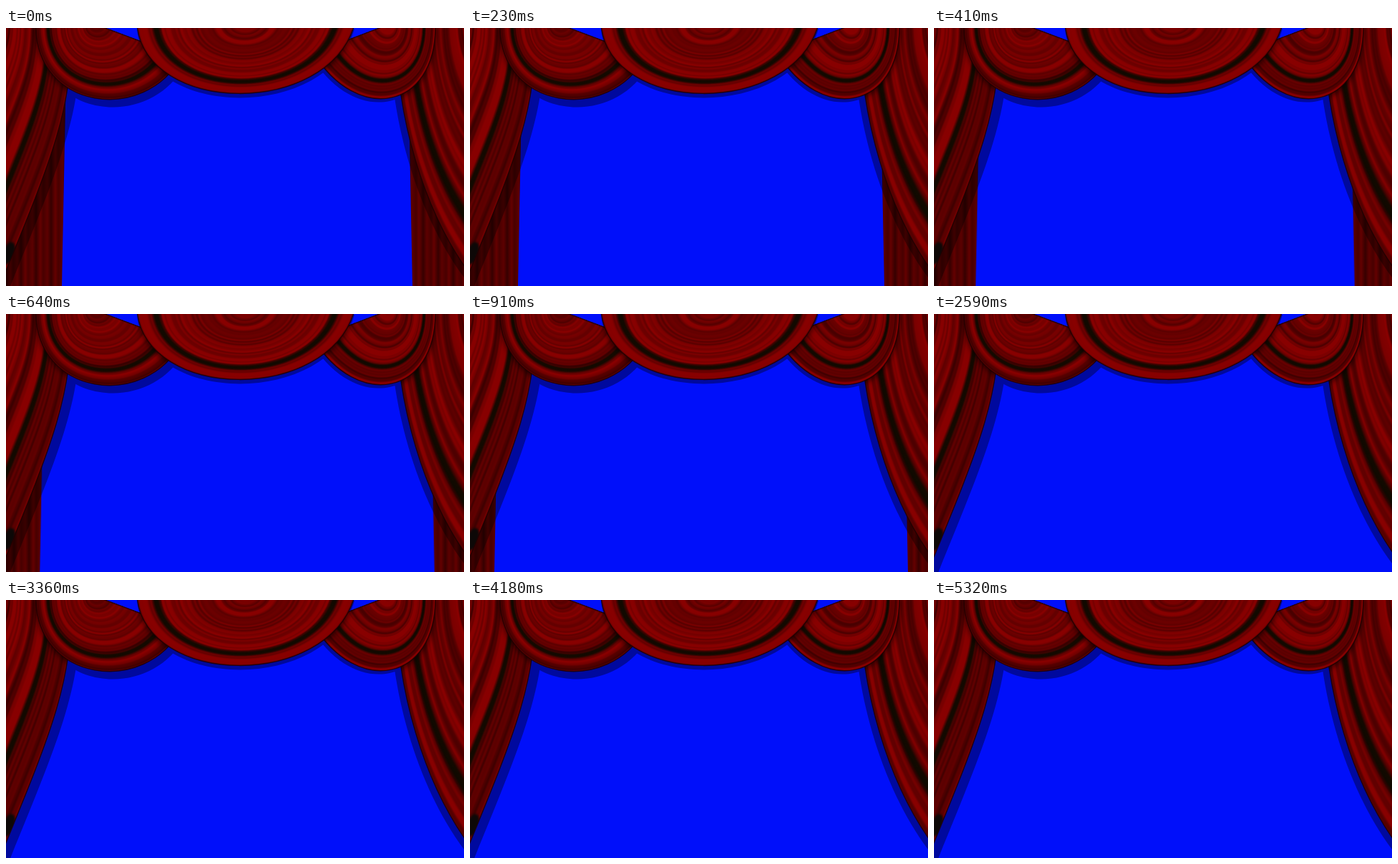
An HTML page with a canvas that plays this animation: 640x360 px, repeating every 5400 ms.

```html
<!DOCTYPE html>
<html lang="en">
<head>
<meta charset="utf-8">
<title>Stage curtain</title>
<style>
  html, body { margin: 0; width: 100%; height: 100%; overflow: hidden; }
  #stage { position: relative; width: 640px; height: 360px; overflow: hidden; background: #000ffa; }
  canvas { position: absolute; left: 0; top: 0; }
  #shadow { opacity: .37; }

  .panel {
    position: absolute; top: 60px; width: 84px; height: 300px;
    background: repeating-linear-gradient(90deg, #360000, #640000 6px, #480000 10px, #5c0000 16px, #360000 21px);
    clip-path: polygon(0 0, 100% 0, 78px 100%, 0 100%);
    animation: open 5400ms infinite;
  }
  .left { left: 0; }
  .right { left: 562px; --mirror: -1; }

  /* The panels slide off stage in the first third of the loop. */
  @keyframes open {
    0% { transform: scaleX(var(--mirror, 1)); animation-timing-function: steps(40); }
    33.3333%, 100% { transform: scaleX(var(--mirror, 1)) translateX(-88px); }
  }
</style>
</head>
<body>
<div id="stage">
  <div class="panel left"></div>
  <div class="panel right"></div>
  <canvas id="shadow" width="640" height="360"></canvas>
  <canvas id="cloth" width="640" height="360"></canvas>
</div>
<script>
const shadow = document.getElementById('shadow').getContext('2d');
const cloth = document.getElementById('cloth').getContext('2d');
const LAYERS = 170;

// hem: cubic curve of the lower edge; focus: point the folds shrink towards;
// cast: offset of the shadow; fold: place of the widest black fold.
const drapes = [
  { hem: [92, -5, 92, 120, 65, 180, -15, 375], focus: [-15, -5], cast: [13, 5], fold: .7 },
  { hem: [545, -5, 544, 120, 583, 260, 655, 352], focus: [655, -5], cast: [-9, 4], fold: .8 },
  { hem: [42, -5, 40, 115, 195, 134, 245, 40], focus: [125, -5], cast: [5, 11], fold: .8 },
  { hem: [600, -5, 602, 115, 490, 134, 430, 35], focus: [535, -5], cast: [-3, 5], fold: .76 },
  { hem: [183, -5, 195, 122, 450, 125, 487, -5], focus: [335, -5], cast: [0, 6], fold: .83 }
];

function seeded(seed) {
  return () => {
    seed = (seed * 16807) % 2147483647;
    return seed / 2147483647;
  };
}

// Smooth random curve over 0..1.
function noise(random, count) {
  const knots = Array.from({ length: count + 2 }, random);
  return k => {
    const i = Math.floor(k * count), f = k * count - i;
    return knots[i] + (knots[i + 1] - knots[i]) * f * f * (3 - 2 * f);
  };
}

function outline({ hem, focus }, k) {
  const p = hem.map((v, i) => focus[i % 2] + (v - focus[i % 2]) * k);
  const path = new Path2D();
  path.moveTo(p[0], p[1]);
  path.bezierCurveTo(...p.slice(2));
  path.lineTo(...focus);
  path.closePath();
  return path;
}

function shader(fold, seed) {
  const random = seeded(seed);
  const broad = noise(random, 16), fine = noise(random, 48);
  return k => {
    const light = Math.min(1, .25 + .6 * broad(k) + .4 * fine(k));
    const crease = Math.min(1, Math.max(.05, Math.abs(k - fold) / .035 - .4));
    return `rgb(${Math.round(14 + 122 * light * crease)},${Math.round(10 * (1 - crease))},0)`;
  };
}

function softShadow(hem) {
  cloth.save();
  cloth.globalCompositeOperation = 'source-atop';
  cloth.shadowColor = 'rgba(0,0,0,.7)';
  cloth.shadowBlur = 8;
  cloth.shadowOffsetY = 3;
  cloth.fill(hem);
  cloth.restore();
}

function drawDrape(drape, index) {
  const hem = outline(drape, 1);
  const shade = shader(drape.fold, 7919 * (index + 3));

  shadow.save();
  shadow.translate(...drape.cast);
  shadow.fill(hem);
  shadow.restore();

  softShadow(hem);
  for (let i = LAYERS; i > 0; i--) {
    cloth.fillStyle = shade(i / LAYERS);
    cloth.fill(outline(drape, i / LAYERS));
  }
  cloth.strokeStyle = 'rgba(28,0,0,.8)';
  cloth.lineWidth = 1.5;
  cloth.stroke(hem);
}

// Dark tie at the foot of the left curtain.
function drawTie() {
  cloth.save();
  cloth.clip(outline(drapes[0], 1));
  cloth.filter = 'blur(1.5px)';
  cloth.fillStyle = '#0d0807';
  cloth.beginPath();
  cloth.ellipse(4, 314, 8, 16, .3, 0, 7);
  cloth.fill();
  cloth.restore();
}

drapes.forEach(drawDrape);
drawTie();
</script>
</body>
</html>
```
